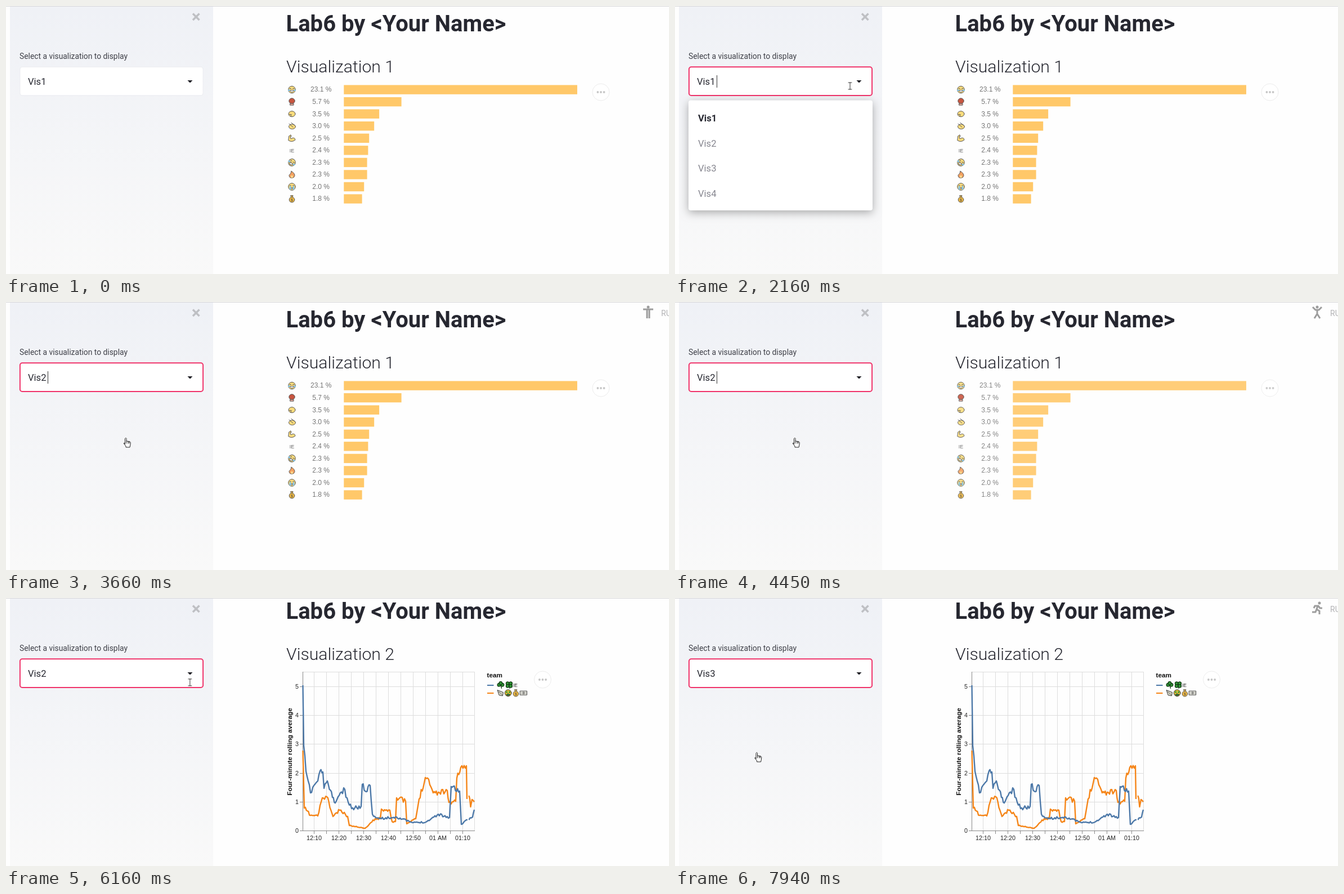
Write an HTML page with a canvas that moves like this. It is 1178x476 px and loops after 8000 ms.

```html
<!DOCTYPE html>
<html lang="en">
<head>
<meta charset="utf-8">
<title>Visualization picker</title>
<style>
html, body { margin: 0; width: 100%; height: 100%; overflow: hidden; background: #fff; }
canvas { display: block; width: 1178px; height: 476px; }
</style>
</head>
<body>
<canvas id="stage"></canvas>
<script>
const W = 1178, H = 476, LOOP = 8000;
const canvas = document.getElementById('stage');
const dpr = window.devicePixelRatio || 1;
canvas.width = W * dpr;
canvas.height = H * dpr;
const c = canvas.getContext('2d');

const UI = 'Roboto, "Open Sans", sans-serif';
const PLOT = '"Liberation Sans", Arial, sans-serif';
const DARK = '#262730', INK = '#565656', SKIN = '#fcdc7c', TEAR = '#86c9ec';
const BLUE = '#4c78a8', ORANGE = '#f58518';

const ramp = (t, a, b) => Math.max(0, Math.min(1, (t - a) / (b - a)));
const within = (t, a, b) => t >= a && t < b;
const smooth = p => p * p * (3 - 2 * p);

function text(str, x, y, font, color, align = 'left') {
  c.font = font;
  c.fillStyle = color;
  c.textAlign = align;
  c.fillText(str, x, y);
}
function rect(x, y, w, h, color) {
  c.fillStyle = color;
  c.fillRect(x, y, w, h);
}
function box(x, y, w, h, r) {
  c.beginPath();
  c.roundRect(x, y, w, h, r);
}
function line(x1, y1, x2, y2, color, width = 1) {
  c.beginPath();
  c.moveTo(x1, y1);
  c.lineTo(x2, y2);
  c.strokeStyle = color;
  c.lineWidth = width;
  c.stroke();
}
function disc(x, y, r, fill, stroke, ry = r) {
  c.beginPath();
  c.ellipse(x, y, r, ry, 0, 0, 7);
  if (fill) { c.fillStyle = fill; c.fill(); }
  if (stroke) { c.strokeStyle = stroke; c.stroke(); }
}
function shape(d, fill, stroke = INK) {
  const p = new Path2D(d);
  if (fill) { c.fillStyle = fill; c.fill(p); }
  if (stroke) { c.strokeStyle = stroke; c.stroke(p); }
}
function at(x, y, draw, turn = 0) {
  c.save();
  c.translate(x, y);
  c.rotate(turn);
  c.lineWidth = 1;
  c.lineJoin = c.lineCap = 'round';
  draw();
  c.restore();
}
function pair(x, y, r, fill, stroke, ry) {
  disc(-x, y, r, fill, stroke, ry);
  disc(x, y, r, fill, stroke, ry);
}

// Small icons, each about 13 px wide around the origin
function face() {
  disc(0, 0, 6.3, SKIN, INK);
  line(-4, -2, -1.5, -2, INK);
  line(4, -2, 1.5, -2, INK);
}
function laugh() {
  face();
  shape('M-4 1H4Q0 8 -4 1Z', '#fff');
  pair(5, 1, 1.7, TEAR);
}
function sob() {
  face();
  pair(3, 2, 1.4, TEAR, null, 3.5);
  disc(0, 2.6, 1.4, '#fff', INK);
}
function glove() {
  disc(0, -1.5, 5.2, '#c9553f', INK, 4.8);
  c.fillStyle = '#e9a99b';
  c.fillRect(-3, 3, 6, 3);
  c.strokeRect(-3, 3, 6, 3);
}
function fist() {
  disc(0, 0, 6, SKIN, INK, 5);
  shape('M-5 1H-1L-2 4');
}
function clap() {
  disc(0.5, 1, 6, SKIN, INK, 4.3);
  shape('M-5 -4L2 2M-1 -6L5 -1', null);
}
function flex() {
  shape('M-5 -4L-2 -6L-1 -3H-3L-2 1Q5 -3 6 3Q0 8 -6 4Z', SKIN);
}
function flame() {
  shape('M-1 -6Q5 -3 5 2Q4 6 0 6Q-5 6 -5 1Q-1 -2 -1 -6Z', '#f3a05f');
  disc(0, 3.5, 1.9, '#fbd98d', null, 2.5);
}
function bag() {
  shape('M-2 -6H2L1 -3H-1Z', '#efb943');
  disc(0, 1.5, 4.8, '#efb943', INK);
  text('$', 0, 4, '7px ' + PLOT, '#444', 'center');
}
function clover() {
  line(0, 0, 1.5, 6, '#173f19', 1.4);
  pair(3, 0, 2.8, '#2f9b35', '#173f19');
  disc(0, -3, 2.8, '#2f9b35', '#173f19');
}
function clover4() {
  line(0, 0, 1, 6, '#173f19', 1.4);
  for (const y of [-2.5, 2]) pair(2.7, y, 2.8, '#2f9b35', '#173f19');
}
function note() {
  c.fillStyle = '#e4e4dc';
  c.strokeStyle = '#444';
  c.fillRect(-6, -3.5, 12, 7);
  c.strokeRect(-6, -3.5, 12, 7);
  disc(0, 0, 1.6, '#b8b8b0', '#555');
  pair(4, 0, 0.6, '#555');
}
function wings() {
  shape('M-5 -5L5 -1L4 5L-2 4Z', '#d8d8c8', '#333');
  line(-3, -2, 3, 3, '#555');
}
function rich() {
  disc(0, 0, 5.8, '#e8c63d', '#222');
  pair(2.4, -1.6, 1.6, '#269336');
  disc(0, 3, 3, '#3ba447', '#222', 1.5);
}

function more(x, y) {
  c.lineWidth = 1;
  disc(x, y, 15, '#fff', '#ececec');
  for (let i = -1; i < 2; i++) disc(x + i * 5.6, y, 1.9, '#c6c6c6');
}

const ICONS = [laugh, glove, fist, clap, flex, null, laugh, flame, sob, bag];
const SHARES = [23.1, 5.7, 3.5, 3, 2.5, 2.4, 2.3, 2.3, 2, 1.8];
function barChart() {
  SHARES.forEach((share, i) => {
    const y = 148.6 + i * 21.55;
    if (ICONS[i]) at(508, y, ICONS[i], i === 6 ? 0.6 : 0);
    else text('IE', 508, y + 3.6, '9px ' + PLOT, '#666', 'center');
    text(share.toFixed(1) + ' %', 559.7, y + 3.8, '12px ' + PLOT, '#757575', 'center');
    rect(600.3, y - 8.2, share * 17.95, 16.4, '#ffc869');
  });
  more(1057, 153);
}

// Turning points as alternating x, y
const BLUE_LINE = [
  527.5,155, 529,262, 533,308, 541,346, 547,333, 554,325, 558,307, 563,309, 565,338, 571,325, 580,354,
  585,364, 590,353, 602,340, 604,354, 614,374, 631,370, 633,331, 638,343, 647,333, 651,384, 663,392,
  694,389, 722,399, 746,398, 768,384, 788,390, 791,335, 806,343, 809,402, 820,394
];
const ORANGE_LINE = [
  527.5,271, 530,373, 541,386, 554,387, 562,355, 570,353, 581,388, 593,377, 607,388, 610,404, 638,409,
  656,392, 665,392, 667,375, 682,377, 686,397, 692,397, 694,355, 710,361, 712,401, 728,392, 734,357,
  745,319, 751,322, 759,346, 768,345, 784,342, 787,363, 799,361, 801,320, 808,301, 818,298, 819,357
];
const BLUE_END = [822.5,394, 829,389, 832,376];
const ORANGE_END = [822.5,351, 825.5,371, 828,358, 832,362];

// Joins the points with a seeded wobble that grows with the value
function plotLine(p, color) {
  let seed = 11;
  const noise = () => (seed = seed * 16807 % 2147483647) / 1073741823.5 - 1;
  c.strokeStyle = color;
  c.lineWidth = 2.4;
  c.lineJoin = 'round';
  c.beginPath();
  c.moveTo(p[0], p[1]);
  for (let i = 2; i < p.length; i += 2) {
    const x = p[i - 2], y = p[i - 1], dx = p[i] - x, dy = p[i + 1] - y;
    const steps = Math.max(1, Math.round(dx / 2));
    for (let k = 1; k < steps; k++) {
      const v = y + dy * k / steps;
      c.lineTo(x + dx * k / steps, v + noise() * Math.min(5, (413 - v) * 0.09));
    }
    c.lineTo(p[i], p[i + 1]);
  }
  c.stroke();
}
function lineChart() {
  const font = '10.75px ' + PLOT, bold = 'bold 11.75px ' + PLOT;
  const times = ['12:10', '12:20', '12:30', '12:40', '12:50', '01 AM', '01:10'];
  for (let i = 0; i < 13; i++) {
    const x = 547.5 + i * 22;
    line(x, 131.5, x, 413, '#ddd');
    line(x, 413, x, 419, '#888');
    if (i % 2 === 0) text(times[i / 2], x, 430, font, '#222', 'center');
  }
  for (let v = 0; v <= 5; v++) {
    const y = Math.round(413.3 - v * 51.3) + 0.5;
    if (v) line(528, y, 832, y, '#ddd');
    line(522, y, 528, y, '#888');
    text(v, 520, y + 3.7, font, '#222', 'right');
  }
  c.strokeStyle = '#ddd';
  c.strokeRect(527.5, 131.5, 305, 282);
  line(527.5, 131, 527.5, 414, '#888');
  line(527, 413.5, 833, 413.5, '#888');
  at(508, 273, () => text('Four-minute rolling average', 0, 0, bold, '#111', 'center'), -Math.PI / 2);
  for (const p of [ORANGE_LINE, ORANGE_END]) plotLine(p, ORANGE);
  for (const p of [BLUE_LINE, BLUE_END]) plotLine(p, BLUE);

  text('team', 854.5, 140.5, bold, '#111');
  line(855, 155, 866.5, 155, BLUE, 2);
  line(855, 169, 866.5, 169, ORANGE, 2);
  at(879, 154.3, clover);
  at(894, 154.3, clover4);
  text('IE', 901, 158, '8.5px ' + PLOT, '#333');
  [wings, rich, bag, note].forEach((icon, i) => at(878.5 + i * 13.7, 168.7, icon));
  more(953.5, 145);
}

// Limbs of the status figure; it leans forward in the running pose
const POSES = [
  'M-5 2L-3 -4H3L5 2M-2 -4V11M2 -4V11',
  'M-9 -5H9M-2 -5V11M2 -5V11',
  'M-8 -9L-3 -4H3L8 -9M0 -4V3L-5 11M0 3L5 11',
  'M-6 0L-4 -4H2L5 0H9M1 -4L-1 2L4 5V11M-1 2L-3 7H-9'
];
function status(t, start) {
  const pose = Math.floor((t - start) / 150) % POSES.length;
  at(1141, 18, () => {
    disc(pose === 3 ? 4 : 0, -9, 2.5, '#9d9d9d');
    c.lineWidth = 3;
    c.lineCap = 'butt';
    c.lineJoin = 'miter';
    shape(POSES[pose], null, '#9d9d9d');
  });
  text('RUNNING...', 1164, 25, '14px ' + UI, '#b4b4b6');
}

// Spans during which each option is highlighted
const HOVER = [
  [[1900, 2860], [6480, 6600]],
  [[2860, 3600], [6570, 6850]],
  [[6850, 7700]],
  []
];
function menu(t, alpha, picked) {
  c.save();
  c.globalAlpha = alpha;
  c.save();
  c.shadowColor = 'rgba(0,0,0,.32)';
  c.shadowBlur = 16 * dpr;
  c.shadowOffsetY = 4 * dpr;
  c.fillStyle = '#fff';
  box(24, 167.5, 327, 195.5, 4);
  c.fill();
  c.restore();
  HOVER.forEach((spans, i) => {
    const k = Math.max(0, ...spans.map(([a, b]) => ramp(t, a, a + 150) * (1 - ramp(t, b, b + 150))));
    const mix = (a, b) => Math.round(a + (b - a) * k);
    const color = `rgb(${mix(134, 38)},${mix(134, 39)},${mix(143, 48)})`;
    text('Vis' + (i + 1), 41, 205 + i * 44.5, (i === picked ? 'bold ' : '') + '16.6px ' + UI, color);
  });
  c.restore();
}

// Pointer stops: time, x, y
const PATH = [
  [140, -4, 488], [480, 598, 206], [840, 381, 296], [1220, 381, 296], [1500, 60, 200], [1830, 311, 142],
  [2710, 311, 142], [3030, 215, 249], [5770, 215, 249], [6250, 338, 140], [6400, 338, 140],
  [6600, 160, 239], [6640, 160, 239], [6790, 182, 262], [6940, 147.5, 282]
];
function pointer(t) {
  let i = PATH.findIndex(k => k[0] > t);
  if (i === 0) return;
  if (i < 0) i = PATH.length;
  const a = PATH[i - 1], b = PATH[i] || a;
  const p = a === b ? 0 : smooth((t - a[0]) / (b[0] - a[0]));
  const x = a[1] + (b[1] - a[1]) * p, y = a[2] + (b[2] - a[2]) * p;
  const inField = x > 25 && x < 349 && y > 109 && y < 159;
  const onMenu = y > 167 && (within(t, 2700, 5800) || t > 6400);
  at(x, y, () => {
    if (inField) shape('M-3 -6H3M0 -6V6M-3 6H3', null, '#333');
    else if (onMenu) {
      shape('M-3.5 3V-6.5Q-2 -9 -1 -6.5V-2L5 -1Q7 0 6 4L5 9H-2V7L-6 2Q-5 0 -3.5 3Z', '#fff', '#222');
      shape('M-1 -2V2M2 -1V2M4 -1V2', null, '#222');
    } else shape('M.5 .5V12L3 9.6L5 13.5L7 12.6L5.3 8.8H8.6Z', '#fff', '#222');
  });
}

function sidebar(t) {
  const g = c.createLinearGradient(0, 0, 0, H);
  g.addColorStop(0, '#eff1f6');
  g.addColorStop(1, '#f9f9f9');
  rect(7, 1, 361, 475, g);
  line(332, 13.5, 343.5, 25, '#bfc0c4', 3.6);
  line(343.5, 13.5, 332, 25, '#bfc0c4', 3.6);
  text('Select a visualization to display', 24, 94, '13.85px ' + UI, '#3f4048');

  const focused = t >= 2000;
  c.fillStyle = '#fff';
  box(25, 108.5, 325, 50, 3);
  c.fill();
  c.lineWidth = focused ? 2 : 1;
  c.strokeStyle = focused ? '#f0336a' : '#ebecf0';
  box(24.9, 108.2, 325.2, 50.8, 4);
  c.stroke();
  shape('M322.5 132H331.5L327 136.6Z', '#1c1c22', null);

  const value = t < 3290 ? 1 : t < 7370 ? 2 : 3;
  text('Vis' + value, 39, 140, '16.6px ' + UI, DARK);
  // the caret restarts its blink on every click
  const click = [7330, 6370, 3250, 2030].find(k => t >= k);
  if (click && Math.floor((t - click) / 530) % 2 === 0) rect(74, 123, 1, 22, '#333');

  const first = ramp(t, 2040, 2150) * (1 - ramp(t, 3270, 3450));
  const second = ramp(t, 6390, 6510) * (1 - ramp(t, 7350, 7530));
  if (first) menu(t, first, t < 3290 ? 0 : 1);
  if (second) menu(t, second, t < 7370 ? 1 : 2);
}

function content(t) {
  const next = t >= 4530, dy = next ? -8 : 0;
  text('Lab6 by <Your Name>', 497.5, 45 + dy, 'bold 40px ' + UI, DARK);
  text('Visualization ' + (next ? 2 : 1), 498, 117.5 + dy, '300 30.2px ' + UI, DARK);
  c.save();
  c.globalAlpha = 1 - 0.67 * ramp(t, next ? 7880 : 4050, next ? 8880 : 5050) ** 2;
  if (next) lineChart();
  else barChart();
  c.restore();
  if (within(t, 3510, 4680)) status(t, 3510);
  if (t >= 7410) status(t, 7410);
}

function draw(t) {
  c.setTransform(dpr, 0, 0, dpr, 0, 0);
  rect(0, 0, W, H, '#fefefe');
  content(t);
  sidebar(t);
  rect(0, 0, W, 1, '#d8d8da');
  pointer(t);
}

const begin = performance.now();
function tick() {
  draw((performance.now() - begin) % LOOP);
  requestAnimationFrame(tick);
}
tick();
</script>
</body>
</html>
```
